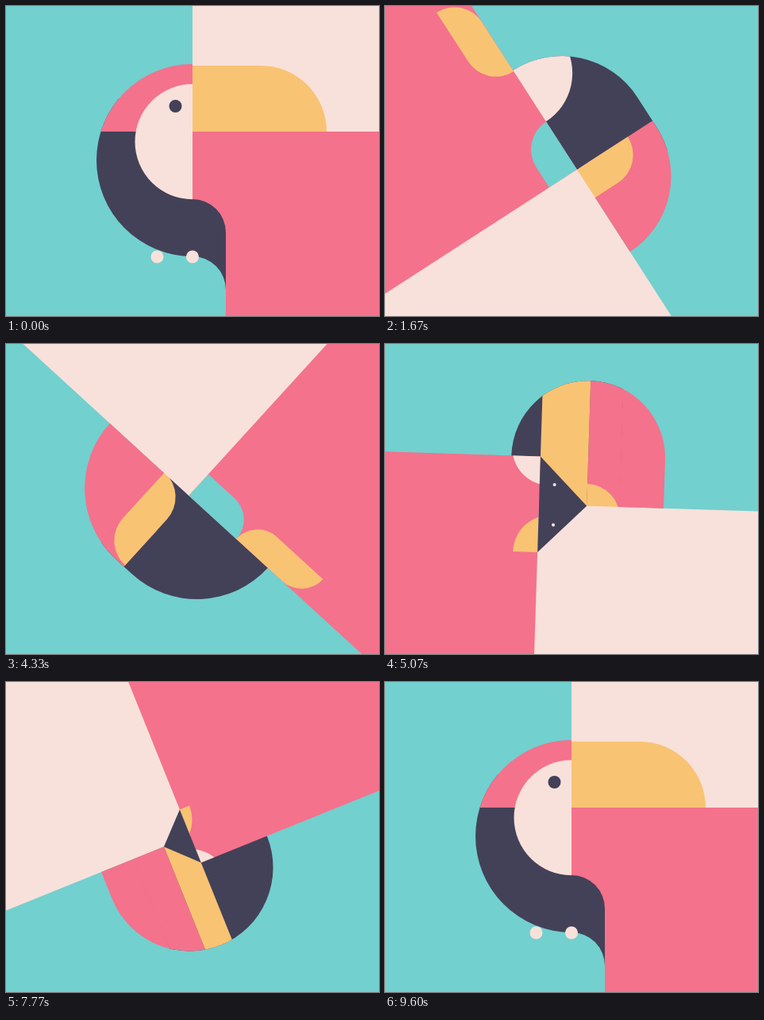
An HTML page with a canvas that plays this animation: 470x390 px, repeating every 9.66 s.

```html
<!DOCTYPE html>
<html lang="en">
<head>
<meta charset="utf-8">
<title>Turning animals</title>
<style>
  html, body { margin: 0; width: 100%; height: 100%; overflow: hidden; background: #72d0cf; }
  canvas { display: block; }
</style>
</head>
<body>
<canvas id="stage" width="470" height="390"></canvas>
<script>
const ctx = document.getElementById('stage').getContext('2d');
const TEAL = '#72d0cf', CREAM = '#f8e1da', PINK = '#f4728c', YELLOW = '#f9c374', DARK = '#434158';
const LOOP = 9660, FAR = 900, LEAF = 115;

const clamp = v => Math.max(0, Math.min(1, v));
const mix = (a, b, k) => a + (b - a) * k;
const ease = u => u < .5 ? 4 * u ** 3 : 1 - 4 * (1 - u) ** 3;
const span = (t, from, to) => ease(clamp((t - from) / (to - from)));

function rect(color, x, y, w, h, radii = 0) {
  ctx.fillStyle = color;
  ctx.beginPath();
  ctx.roundRect(x, y, w, h, radii);
  ctx.fill();
}

function dot(color, x, y, r) {
  if (r <= 0) return;
  ctx.fillStyle = color;
  ctx.beginPath();
  ctx.arc(x, y, r, 0, Math.PI * 2);
  ctx.fill();
}

function clipped(x, y, w, h, draw) {
  ctx.save();
  ctx.beginPath();
  ctx.rect(x, y, w, h);
  ctx.clip();
  draw();
  ctx.restore();
}

// Local axes: y > 0 is the teal half, x splits the other half into cream and pink.
function poseAt(t) {
  const pose = {
    angle: 90 + 270 * span(t, -59, 3297) + 270 * span(t, 3219, 6490) + 180 * span(t, 6450, 9350),
    px: 0, py: 0,
    left: 36, right: 36, cy: 0, r: 121,
    fox: 0, foxEyes: 0,
    toucan: 0, parts: 0,
    faceX: 12.7, faceY: 0,
    trunk: -200, leafH: 36.5, tealEnd: -200, yellowStart: 400,
    eye: 0
  };
  if (t < 3220) {
    const p = span(t, 0, 3000);
    Object.assign(pose, {
      px: 37 * (1 - p),
      left: mix(36, -34.5, p), right: mix(36, 35, p), r: mix(121, 109, p),
      toucan: 1 - clamp(p / .5), parts: 1 - clamp(p / .3),
      faceX: 12.7 + 202 * p,
      trunk: -190 + 224 * p,
      leafH: mix(43.5, 36.5, p ** 3),
      tealEnd: -60 + 202 * p,
      yellowStart: 145 + 6 * (1 - p) + 155 * clamp(1 - p / .6),
      eye: clamp((t - 2500) / 500)
    });
  } else if (t < 6450) {
    const p = span(t, 3220, 6120);
    const gather = clamp(p / .37), grow = clamp((p - .3) / .7);
    Object.assign(pose, {
      px: 22.5 * p + 8 * p * (1 - p), py: 11 * grow,
      left: -34.5 * (1 - gather), right: 35 * (1 - gather),
      cy: 83 * grow, r: mix(109 + 20 * gather, 85, grow),
      fox: grow, foxEyes: clamp((p - .7) / .3),
      faceX: 214.7 + 60 * p,
      trunk: 34 - 156 * p,
      tealEnd: 142 - 270 * p, yellowStart: 145 - 285 * p,
      eye: 1 - clamp(p / .1)
    });
  } else {
    const p = span(t, 6450, 8980);
    const late = clamp((p - .6) / .4);
    Object.assign(pose, {
      px: mix(22.5, 37, p) + 30 * p * (1 - p), py: 11 * (1 - p) ** 2,
      left: 36 * p, right: 36 * p, cy: 83 * (1 - p), r: 85 + 36 * p,
      fox: 1 - p, foxEyes: 1 - clamp(p / .3),
      toucan: late, parts: late,
      faceY: -73 * (1 - late)
    });
  }
  return pose;
}

function drawBody(o, s) {
  const { left, right, cy, r, trunk } = o;
  const band = Math.max(0, trunk);
  ctx.save();
  ctx.beginPath();
  ctx.moveTo(right + r, -1);
  ctx.lineTo(right + r, cy);
  ctx.arc(right, cy, r, 0, Math.PI / 2);
  ctx.arc(left, cy, r, Math.PI / 2, Math.PI);
  ctx.lineTo(left - r, -1);
  ctx.closePath();
  ctx.clip();
  rect(DARK, -FAR, -1, FAR, band + 1.5);
  rect(DARK, -42, -1, FAR, FAR);
  rect(PINK, -FAR, band, FAR - 41, FAR);
  rect(PINK, -41.5, Math.max(band, trunk + 60), 41.5, FAR);
  if (s > 0) rect(YELLOW, 0, -1, s, FAR);
  dot(CREAM, o.faceX, o.faceY, 72.5);
  if (o.eye > 0) clipped(-FAR, 0, FAR, band, () => dot(CREAM, -84, mix(42, 20, o.eye), 6));
  ctx.restore();
  rect(YELLOW, -42, trunk, 42, 120, [0, 42, 0, 42]);
}

function drawLeaves(o) {
  const h = o.leafH;
  clipped(0, -FAR, FAR, FAR, () => {
    rect(TEAL, o.tealEnd - LEAF, -h, LEAF, h + .5, [0, h, 0, h]);
    rect(YELLOW, o.yellowStart, -h, LEAF, h, [h, 0, h, 0]);
    if (o.toucan > 0) {
      const y = 43 * (1 - o.toucan) - 42;
      rect(DARK, 85, y, LEAF, 42.5, [42, 0, 0, 0]);
      rect(TEAL, 157, y, LEAF, 42.5, [42, 0, 0, 0]);
    }
  });
}

function drawEars(s, fox) {
  const hide = 1 - fox;
  clipped(s, -s, FAR, 2 * s, () => {
    dot(YELLOW, s - 60 * hide, -s, 47);
    dot(CREAM, s - 41 * hide, s + 41 * hide, 47);
  });
}

function drawHead(s, eyes) {
  ctx.fillStyle = DARK;
  ctx.beginPath();
  ctx.moveTo(0, 0);
  ctx.lineTo(s, -s);
  ctx.lineTo(s, s);
  ctx.fill();
  dot(CREAM, 41.4, -25.3, 5.5 * eyes);
  dot(CREAM, 41.4, 25.3, 5.5 * eyes);
}

function draw(t) {
  const o = poseAt(t), s = 82.5 * o.fox;
  ctx.setTransform(1, 0, 0, 1, 0, 0);
  rect(TEAL, 0, 0, 470, 390);
  ctx.translate(235, 195);
  ctx.rotate(o.angle * Math.PI / 180);
  ctx.translate(-o.px, -o.py);

  drawBody(o, s);
  rect(PINK, s - 1, -FAR, FAR, FAR);
  if (s > 0) rect(PINK, s, -1, FAR, s + 1);
  drawLeaves(o);
  rect(CREAM, -FAR, -FAR, FAR + s, FAR);
  if (o.toucan > 0) {
    clipped(-FAR, -FAR, FAR, FAR, () =>
      rect(YELLOW, -83, 169 * (1 - o.toucan) - 169, 83, 169, [83, 0, 0, 0]));
  }
  if (s > 0) {
    drawEars(s, o.fox);
    drawHead(s, o.foxEyes);
  }
  dot(DARK, -32, 21.5, 8 * o.parts);
  dot(CREAM, 157.5, 44.5, 8 * o.parts);
  dot(CREAM, 157.5, 0, 8 * o.parts);
}

const start = performance.now();
function tick() {
  draw((performance.now() - start) % LOOP);
  requestAnimationFrame(tick);
}
tick();
</script>
</body>
</html>
```
